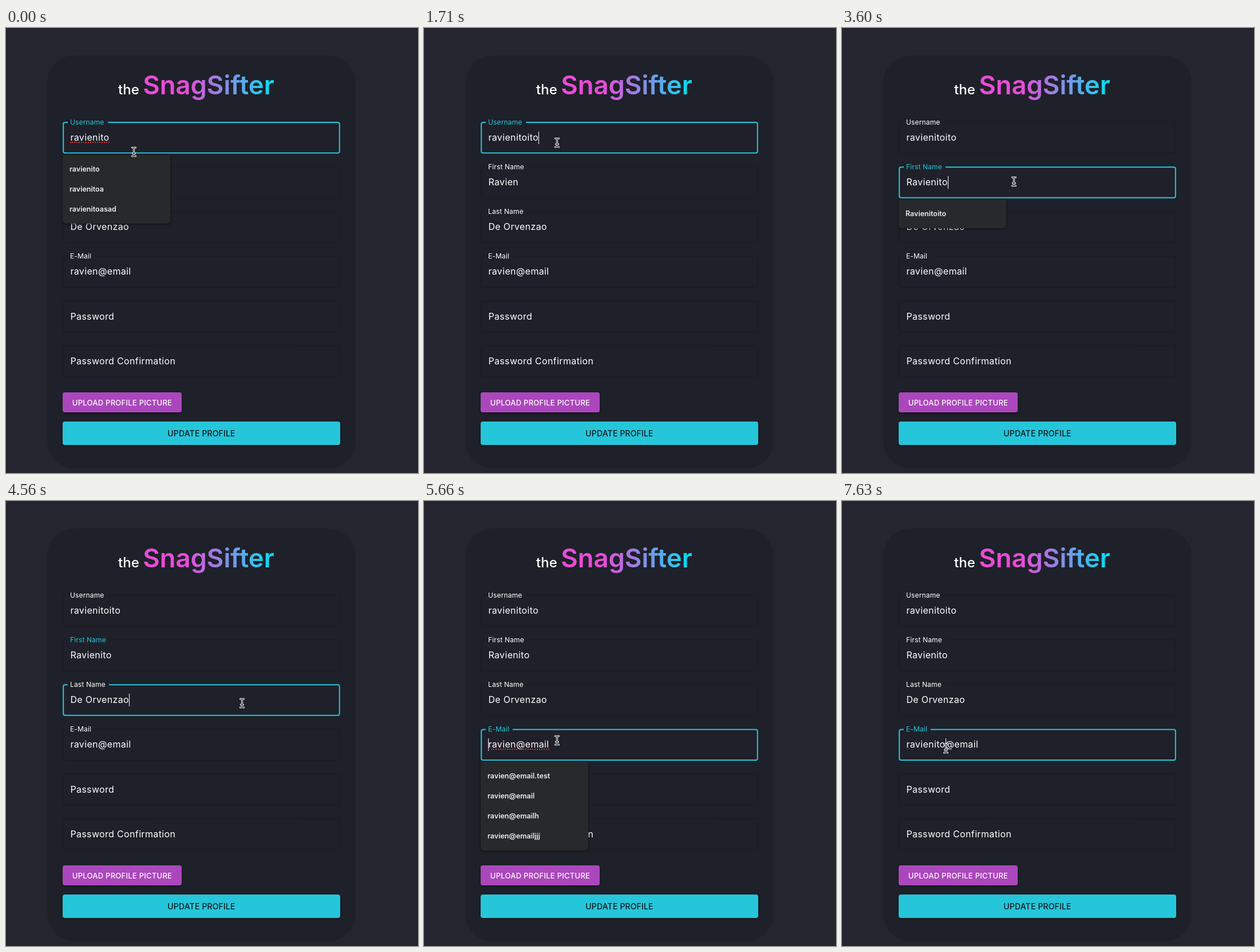
An HTML page for the animation above (8000 ms loop, 720 by 778 pixels).

```html
<!DOCTYPE html>
<html lang="en">
<head>
<meta charset="utf-8">
<title>Update profile</title>
<style>
  :root { --page: #252530; --card: #1e2129; --cyan: #26c6da; }
  html, body { margin: 0; width: 100%; height: 100%; overflow: hidden; background: var(--page); }
  body { position: relative; font: 16px/20px Inter, sans-serif; letter-spacing: .35px; color: #fff; cursor: none; }
  * { box-sizing: border-box; }
  .card, h1, .field, .button, .menu, svg { position: absolute; margin: 0; white-space: pre; }

  .card { left: 72px; top: 48px; width: 539px; height: 722px; border-radius: 48px; background: var(--card); }
  h1 { left: 196px; top: 70px; font: 600 45.4px/60px Inter, sans-serif; letter-spacing: 0; }
  h1 small { font-size: 24px; font-weight: 500; line-height: 1; }
  h1 span {
    background: linear-gradient(90deg, #ea4bd8 32%, #6f9be8 70%, #08dcf2 98%);
    -webkit-background-clip: text; background-clip: text; color: transparent;
  }

  svg { left: 0; top: 0; overflow: visible; }
  #outlines rect { fill: #1f202a; stroke: #191b22; }
  #outlines .focused { stroke: var(--cyan); }

  .field { left: 99px; padding: 17px 13.4px; }
  .label {
    position: absolute; left: 9px; top: -7px; padding: 0 6px 0 4px;
    background: var(--card); font-size: 12px; line-height: 16px; letter-spacing: .15px;
  }
  .value { position: relative; display: inline-block; }
  .misspelled::after {
    content: ""; position: absolute; left: 0; right: 0; bottom: 0; border-bottom: 2px dotted #cf3a33;
  }
  .caret { position: absolute; top: 0; width: 1px; height: 22px; background: #fff; }

  .button {
    left: 99px; border-radius: 4px; text-align: center; font-weight: 500;
    box-shadow: 0 3px 1px -2px #0003, 0 2px 2px #0002, 0 1px 5px #0002;
  }
  .upload { top: 637px; width: 208px; height: 35px; line-height: 36px; font-size: 13px; letter-spacing: .25px; background: #ab47bc; }
  .update { top: 688px; width: 485px; height: 41px; line-height: 41px; font-size: 14px; letter-spacing: .15px; background: var(--cyan); color: #12171c; }

  .menu {
    left: 99px; width: 188px; padding: 7px 12px 8px; border-radius: 0 0 5px 5px;
    background: #28292b; box-shadow: 0 1px 4px #0009; color: #ececec; font-size: 12.5px; letter-spacing: 0;
  }
  .menu.profile { width: 211px; }
  .menu b { display: block; line-height: 35px; font-weight: 600; }
  .menu span { display: block; margin-top: -6px; font-size: 11.6px; }
  .menu em {
    display: block; margin: 15px -12px -9px; padding-left: 12px;
    border-top: 1px solid #404143; line-height: 40px; font-style: normal;
  }
  #pointer { fill: none; stroke-linecap: round; }
</style>
</head>
<body>
<div class="card"></div>
<h1><small>the </small><span>SnagSifter</span></h1>
<svg id="outlines" width="1" height="1"></svg>
<div id="fields"></div>
<div class="button upload">UPLOAD PROFILE PICTURE</div>
<div class="button update">UPDATE PROFILE</div>
<div id="menu"></div>
<svg id="pointer" width="1" height="1">
  <defs><path id="beam" d="M-3-7.5Q0-7.5 0-5.5Q0-7.5 3-7.5M0-5.5V5.5M-3 7.5Q0 7.5 0 5.5Q0 7.5 3 7.5M-2 2.5H2"/></defs>
  <use href="#beam" stroke="#fff" stroke-width="3"/>
  <use href="#beam" stroke="#1c1d22" stroke-width="1.1"/>
</svg>
<script>
const LOOP = 8000, BLINK = 480, FADE = 140;
const BOX = { left: 99.2, top: 164, width: 484.6, height: 55.5, pitch: 78.15 };
const LABELS = ['Username', 'First Name', 'Last Name', 'E-Mail'];
const PLACEHOLDERS = ['Password', 'Password Confirmation'];

const suggestions = (...names) => ({ html: names.map(n => `<b>${n}</b>`).join('') });
const profile = name => ({
  kind: 'profile',
  html: `<b>${name}</b><span>Ravien Calmendez De Orvenzao</span><em>Manage...</em>`
});

// Each step overrides part of the state; "|" in a value marks the caret.
const STEPS = [
  { at: 0, user: 'ravienito|', first: 'Ravien|', last: 'De Orvenzao|', mail: '|ravien@email',
    focus: 0, focusAt: -1000, blinkAt: -780, misspelled: true,
    menu: suggestions('ravienito', 'ravienitoa', 'ravienitoasad') },
  { at: 1440, user: 'ravienitoi|', misspelled: false, blinkAt: 1440 },
  { at: 1500, menu: null },
  { at: 1560, user: 'ravienitoit|', blinkAt: 1560 },
  { at: 1710, user: 'ravienitoito|', blinkAt: 1710 },
  { at: 2600, focus: 1, focusAt: 2600, blinkAt: 2600, menu: profile('Ravien') },
  { at: 3360, first: 'Ravieni|', blinkAt: 3360, menu: suggestions('Ravienitoito') },
  { at: 3540, first: 'Ravienit|', blinkAt: 3540 },
  { at: 3600, first: 'Ravienito|', blinkAt: 3600 },
  { at: 4560, focus: 2, focusAt: 4560, blinkAt: 4560, menu: null },
  { at: 4620, menu: profile('De Orvenzao') },
  { at: 5380, focus: 3, focusAt: 5380, blinkAt: 5380, misspelled: true, menu: null },
  { at: 5480, menu: suggestions('ravien@email.test', 'ravien@email', 'ravien@emailh', 'ravien@emailjjj') },
  { at: 6200, mail: 'ravien|@email', blinkAt: 6200 },
  { at: 7150, mail: 'ravieni|@email', blinkAt: 7150, misspelled: false, menu: null },
  { at: 7330, mail: 'ravienit|@email', blinkAt: 7330 },
  { at: 7630, mail: 'ravienito|@email', blinkAt: 7630 }
];

// Pointer path: time, x, y
const PATH = [
  [0, 223, 216], [110, 223, 216], [490, 232, 200], [2190, 232, 200], [2550, 300, 267],
  [2680, 300, 267], [2740, 300, 268], [4020, 300, 268], [4530, 412, 353], [4860, 412, 353],
  [5380, 232, 418], [5700, 232, 418], [6260, 168, 428], [6480, 168, 428], [6680, 181, 432], [LOOP, 181, 432]
];

const byId = id => document.getElementById(id);
const clamp = x => Math.min(1, Math.max(0, x));
const topOf = index => BOX.top + BOX.pitch * index;
const stateAt = t => Object.assign({}, ...STEPS.filter(s => s.at <= t));

function pointerAt(t) {
  const i = Math.max(1, PATH.findIndex(p => p[0] > t));
  const [t0, x0, y0] = PATH[i - 1], [t1, x1, y1] = PATH[i];
  const p = clamp((t - t0) / (t1 - t0)), k = p * p * (3 - 2 * p);
  return [x0 + (x1 - x0) * k, y0 + (y1 - y0) * k].map(Math.round);
}

function outline(index, focused) {
  const line = focused ? 2 : 1;
  return `<rect class="${focused ? 'focused' : ''}" stroke-width="${line}" rx="3"
    x="${BOX.left + line / 2}" y="${topOf(index) + line / 2}"
    width="${BOX.width - line}" height="${BOX.height - line}"/>`;
}

function fieldHtml(index, text, state, t) {
  const focused = index === state.focus;
  const fade = clamp((t - state.focusAt) / FADE);
  const tint = focused ? fade : index === state.focus - 1 ? 1 - fade : 0;
  const caretOn = focused && Math.floor((t - state.blinkAt) / BLINK) % 2 === 0;
  const label = LABELS[index]
    ? `<div class="label" style="color:color-mix(in srgb, var(--cyan) ${tint * 100}%, #fff)">${LABELS[index]}</div>` : '';
  const value = text.replace('|', caretOn ? '<i class="caret"></i>' : '');
  return `<div class="field" style="top:${Math.round(topOf(index))}px">${label}` +
    `<span class="value ${focused && state.misspelled ? 'misspelled' : ''}">${value}</span></div>`;
}

function render(t) {
  const state = stateAt(t), { menu } = state;
  const texts = [state.user, state.first, state.last, state.mail, ...PLACEHOLDERS];
  byId('outlines').innerHTML = texts.map((_, i) => outline(i, i === state.focus)).join('');
  byId('fields').innerHTML = texts.map((text, i) => fieldHtml(i, text, state, t)).join('');
  byId('menu').innerHTML = menu
    ? `<div class="menu ${menu.kind || ''}" style="top:${Math.round(topOf(state.focus)) + 58}px">${menu.html}</div>` : '';
  byId('pointer').style.transform = `translate(${pointerAt(t).map(v => v + .5 + 'px')})`;
}

function tick() {
  render(performance.now() % LOOP);
  requestAnimationFrame(tick);
}
tick();
</script>
</body>
</html>
```
